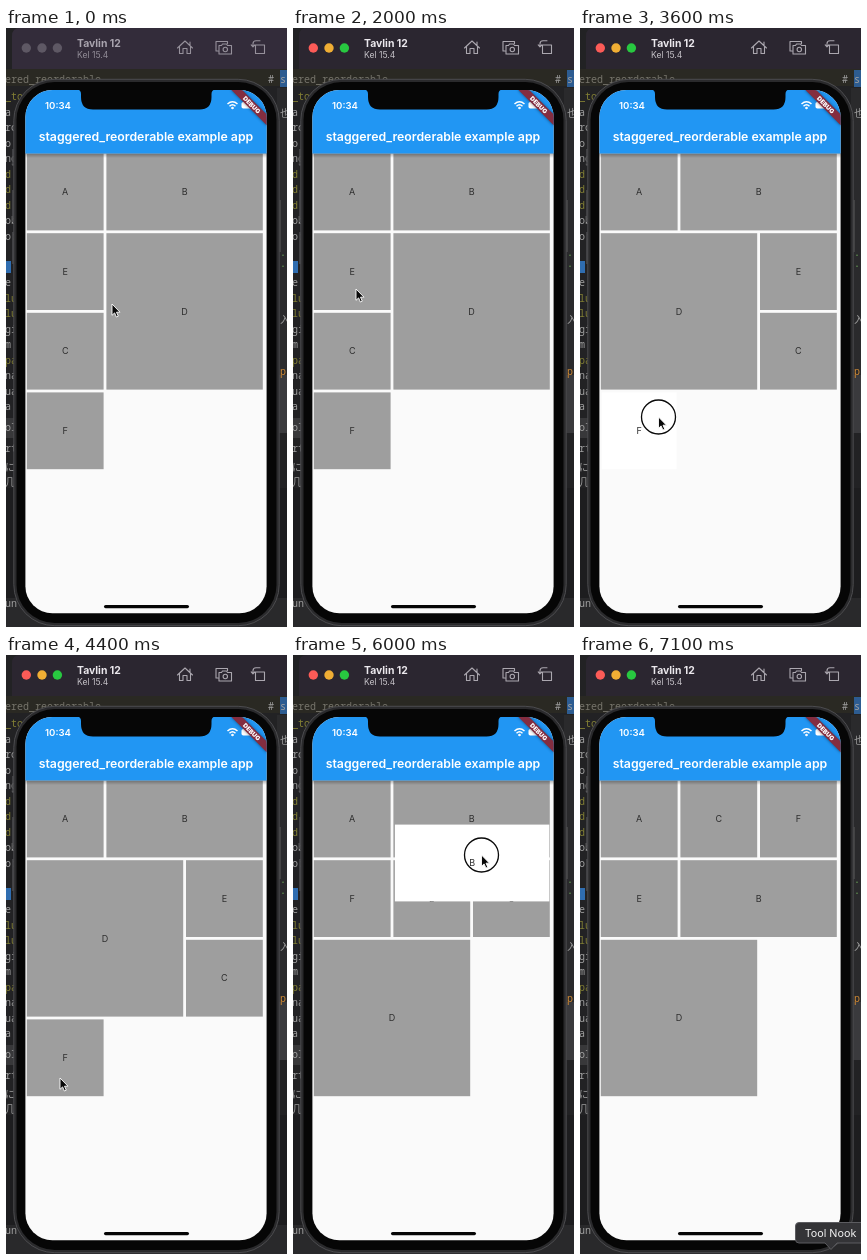
These frames come from a looping animation (281 by 599 pixels, 7.2 s). An HTML page:

```html
<!DOCTYPE html>
<html lang="en">
<head>
<meta charset="utf-8">
<title>Reorderable grid</title>
<style>
  html, body { margin: 0; width: 100%; height: 100%; overflow: hidden; background: #1d1d1f; }
  svg { display: block; width: 100vw; height: 100vh; }
  text { font-family: Inter, Roboto, sans-serif; }
  .code text { font: 10px "Noto Sans Mono", "Noto Sans CJK SC", "Noto Sans CJK JP", monospace; }
  .cell text { font-size: 9px; fill: #2e2e2e; text-anchor: middle; }
</style>
</head>
<body>
<svg viewBox="0 0 281 599" preserveAspectRatio="none">
  <defs>
    <clipPath id="screen"><rect x="19.4" y="62" width="241.2" height="523.2" rx="27"/></clipPath>
    <linearGradient id="shade" x2="0" y2="1">
      <stop offset="0" stop-opacity=".32"/>
      <stop offset="1" stop-opacity="0"/>
    </linearGradient>
    <filter id="soft" x="-20%" y="-100%" width="140%" height="300%"><feGaussianBlur stdDeviation="1.6"/></filter>
  </defs>

  <!-- editor behind the window -->
  <rect width="281" height="599" fill="#222224"/>
  <rect y="41" width="281" height="17" fill="#2a2923"/>
  <rect y="390" width="10" height="20" fill="#38383a"/>
  <rect y="460" width="281" height="110" fill="#1d1d1f"/>
  <rect y="570" width="281" height="29" fill="#29292b"/>
  <rect x="271" y="60" width="10" height="287" fill="#2a2a2c"/>
  <rect x="271" y="347" width="10" height="58" fill="#3a3a3d"/>
  <rect x="274" y="42" width="7" height="17" fill="#2d5c91"/>
  <rect y="233" width="5" height="12" fill="#2f6db0"/>
  <g class="code" id="code"></g>

  <!-- window bar -->
  <path id="bar" d="M6 41V8Q6 0 14 0H281V41Z"/>
  <g id="lights">
    <circle cx="20.3" cy="20" r="4.7"/><circle cx="36" cy="20" r="4.7"/><circle cx="51.4" cy="20" r="4.7"/>
  </g>
  <g id="label">
    <text x="71" y="19" font-size="10.4" font-weight="700">Tavlin 12</text>
    <text x="71" y="30" font-size="8.6" opacity=".8">Kel 15.4</text>
  </g>
  <g id="icons" fill="none" stroke-width="1.1" stroke-linejoin="round" stroke-linecap="round">
    <path d="M171.5 20L179 13L186.5 20M173.5 18.500V25.500H177V20.500H181V25.500H184.5V18.500M184 17V14"/>
    <path d="M212 23H210V13.500H221.5V15.500M213 17.500H215.5L216.5 16H220.5L221.5 17.500H225.5V26H213Z"/>
    <circle cx="219.3" cy="21.5" r="2.2"/>
    <path d="M249.5 17H258.5V25.500H249.5ZM254 12.800H250Q247 12.800 247 15.800V18.500M245.2 16.800L247 18.800L248.8 16.800"/>
  </g>

  <!-- phone -->
  <path d="M7 121V138M7 162V194M7 204V236M274 172V224" stroke="#4a4a4c" stroke-width="1.6"/>
  <rect x="7.8" y="51.3" width="265.4" height="546.4" rx="41" fill="#2a2a2c" stroke="#4c4c4f"/>
  <rect x="10.5" y="54" width="260" height="541" rx="38" fill="#060606"/>
  <g clip-path="url(#screen)">
    <rect x="19" y="62" width="242" height="524" fill="#fafafa"/>
    <g id="cells"></g>
    <rect x="19" y="125" width="242" height="5" fill="url(#shade)"/>
    <rect x="19" y="62" width="242" height="63.5" fill="#2196f3"/>
    <text x="52" y="80.5" font-size="9.6" font-weight="600" fill="#fff" text-anchor="middle">10:34</text>
    <text x="140" y="113" font-size="12.3" font-weight="600" fill="#fff" text-anchor="middle">staggered_reorderable example app</text>
    <g fill="none" stroke="#fff" stroke-width="1.5">
      <path d="M221.5 76Q226.5 71.500 231.5 76M223.5 78.200Q226.5 75.400 229.5 78.200"/>
      <circle cx="226.5" cy="80" r=".6"/>
    </g>
    <rect x="235.5" y="74" width="12" height="6.5" rx="1.8" fill="#fff"/>
    <g transform="translate(245.7 76.9) rotate(45)">
      <rect x="-25" y="-3.8" width="50" height="7.6" opacity=".5" filter="url(#soft)"/>
      <rect x="-25" y="-3.8" width="50" height="7.6" fill="#842d40"/>
      <text y="2.2" font-size="6.2" font-weight="900" fill="#fff" text-anchor="middle">DEBUG</text>
    </g>
    <rect x="98" y="577" width="85" height="3.2" rx="1.6" fill="#050505"/>
  </g>
  <path d="M71.5 61.500Q75 62 75 66V69Q75 81.500 87 81.500H193.5Q205.5 81.500 205.5 69V66Q205.5 62 209 61.500Z" fill="#060606"/>

  <g id="lifted" class="cell"><rect fill="#fff"/><text></text></g>

  <g id="tip">
    <path d="M219 567.500H285V588H257L251 594.500L245 588H219Q215.5 588 215.5 584.500V571Q215.5 567.500 219 567.500Z" fill="#343437" stroke="#5c5c60"/>
    <text x="250.5" y="582" font-size="10.8" fill="#f2f2f2" text-anchor="middle">Tool Nook</text>
  </g>
  <g id="pointer">
    <circle id="ring" r="17" fill="none" stroke="#0a0a0a" stroke-width="1.3"/>
    <path d="M0 0V11.300L2.600 8.900L4.400 13L6.300 12.200L4.500 8.200H8Z" fill="#080808" stroke="#fff" stroke-width=".9" stroke-linejoin="round"/>
  </g>
</svg>
<script>
const NS = 'http://www.w3.org/2000/svg';
const LOOP = 7200, STEP = 100, SLIDE = 300;
const $ = id => document.getElementById(id);
const set = (el, attrs) => { for (const k in attrs) el.setAttribute(k, attrs[k]); return el; };
const add = (parent, tag, attrs, text = '') => {
  const el = set(document.createElementNS(NS, tag), attrs);
  el.textContent = text;
  return parent.appendChild(el);
};
const show = (el, on) => el.setAttribute('visibility', on ? 'visible' : 'hidden');
const ease = u => u * u * (3 - 2 * u);
const mix = (a, b, u) => a + (b - a) * u;

// visible scraps of the editor
const gray = '#a0a0a0', olive = '#827f34', dim = '#77756c';
const scraps = [
  [55, 'ered_reorderable', dim], [72, '_to', olive], [88, 'a', gray], [103, 'ro', gray],
  [119, 'o', gray], [134, 'ng', gray], [150, 'd', olive], [165, 'd.', olive], [181, 'd', olive],
  [196, 'ob', gray], [212, 'o:', gray], [258, 'e', gray], [274, 'lu', olive], [289, 'lu', olive],
  [305, 'gi', gray], [320, 'm', gray], [336, 'pa', olive], [351, 'na', gray], [367, 'ua', gray],
  [382, 'a', gray], [403, 'ol', gray], [424, 'rt', gray], [443, 'に', gray], [458, '几', gray], [579, 'un', gray]
];
for (const [y, s, fill] of scraps) add($('code'), 'text', { x: -1, y, fill }, s);
for (const [x, y, s, fill] of [[262, 55, '#', gray], [274, 55, 's', gray], [274, 89, '也', gray],
  [274, 228, '.', '#6fae5a'], [274, 239, '.', '#6fae5a'], [274, 295, '入', gray], [274, 347, 'p', '#d08a35']])
  add($('code'), 'text', { x, y, fill }, s);

// first-fit packing into three columns
const size = { A: [1, 1], B: [2, 1], C: [1, 1], D: [2, 2], E: [1, 1], F: [1, 1] };
const PITCH = 79.6, GAP = 2.8;
function pack(order) {
  const used = new Set(), place = {};
  for (const id of order) {
    const [w, h] = size[id];
    for (let i = 0; !place[id]; i++) {
      const c = i % 3, r = Math.floor(i / 3), spots = [];
      for (let x = c; x < c + w; x++) for (let y = r; y < r + h; y++) spots.push(x + ',' + y);
      if (c + w > 3 || spots.some(s => used.has(s))) continue;
      spots.forEach(s => used.add(s));
      place[id] = [20.8 + c * PITCH, 125.6 + r * PITCH];
    }
  }
  return place;
}
const layouts = [[0, 'ABEDCF'], [600, 'ABCDEF'], [1700, 'ABEDCF'], [2800, 'ABDECF'],
  [5100, 'ABFECD'], [6400, 'ACFEBD']].map(([t, order]) => [t, pack(order)]);

// card, press, lift, release
const drags = [['E', 200, 300, 600], ['E', 1000, 1200, 1700], ['E', 2100, 2300, 2800],
  ['F', 3300, 3500, 4100], ['F', 4500, 4600, 5100], ['B', 5600, 5800, 6400]];

const path = [[0, 106, 276], [200, 66, 246], [300, 66, 246], [600, 72, 328], [900, 74, 333],
  [1200, 74, 333], [1700, 66, 254], [2000, 63, 261], [2300, 63, 261], [2800, 172, 290],
  [3300, 78.5, 389], [3600, 78.5, 389], [3900, 88, 366], [4100, 66, 404], [4400, 54, 423],
  [4600, 54, 423], [5100, 92, 293], [5600, 188, 156], [5800, 188, 156], [6000, 188.5, 200],
  [6400, 218, 246], [6500, 220, 250], [6900, 250, 592], [7100, 251, 606], [7200, 251, 606]];
function pointerAt(t) {
  const i = path.findIndex(k => k[0] > t);
  const [a, b] = [path[i - 1], path[i]];
  const u = ease((t - a[0]) / (b[0] - a[0]));
  return [mix(a[1], b[1], u), mix(a[2], b[2], u)];
}

const cells = {};
for (const id in size) {
  const g = add($('cells'), 'g', { class: 'cell' });
  add(g, 'rect', { fill: '#9e9e9e' });
  add(g, 'text', {}, id);
  cells[id] = g;
}
function fit(g, id, x, y, inset = 0) {
  const [w, h] = size[id].map(n => n * PITCH - GAP);
  set(g, { transform: `translate(${x} ${y})` });
  set(g.firstElementChild, { x: inset, width: w - 2 * inset, height: h });
  set(g.lastElementChild, { x: w / 2, y: h / 2 + 3.2 });
}

function draw(t) {
  const n = layouts.filter(l => l[0] <= t).length - 1;
  const [start, now] = layouts[n], before = layouts[Math.max(0, n - 1)][1];
  const u = ease(Math.min(1, (t - start) / SLIDE));
  const [px, py] = pointerAt(t);
  const drag = drags.find(d => t >= d[1] && t < d[3]);
  const held = drag && t >= drag[2];

  for (const id in cells) {
    fit(cells[id], id, mix(before[id][0], now[id][0], u), mix(before[id][1], now[id][1], u));
    show(cells[id], true);
  }
  show($('lifted'), held);
  if (held) {
    const id = drag[0], [gx, gy] = pointerAt(drag[2]);
    const dx = px - gx, dy = py - gy;
    $('lifted').lastElementChild.textContent = id;
    fit($('lifted'), id, now[id][0] + dx, now[id][1] + dy, 1);
    show(cells[id], dx || dy);
  }

  set($('pointer'), { transform: `translate(${px} ${py})` });
  show($('ring'), drag);
  show($('tip'), t >= 6900);

  const active = t >= 200;
  set($('bar'), { fill: active ? '#2b2630' : '#332c3a' });
  set($('label'), { fill: active ? '#ebe8ed' : '#a9a4ae' });
  set($('icons'), { stroke: active ? '#aba7af' : '#96919b' });
  const tones = active ? ['#fc5b57', '#f0ae34', '#28c840'] : Array(3).fill('#5e5864');
  [...$('lights').children].forEach((c, i) => set(c, { fill: tones[i] }));
}

const origin = performance.now();
function tick() {
  const t = (performance.now() - origin) % LOOP;
  draw(Math.floor(t / STEP) * STEP);
  requestAnimationFrame(tick);
}
draw(0);
requestAnimationFrame(tick);
</script>
</body>
</html>
```
